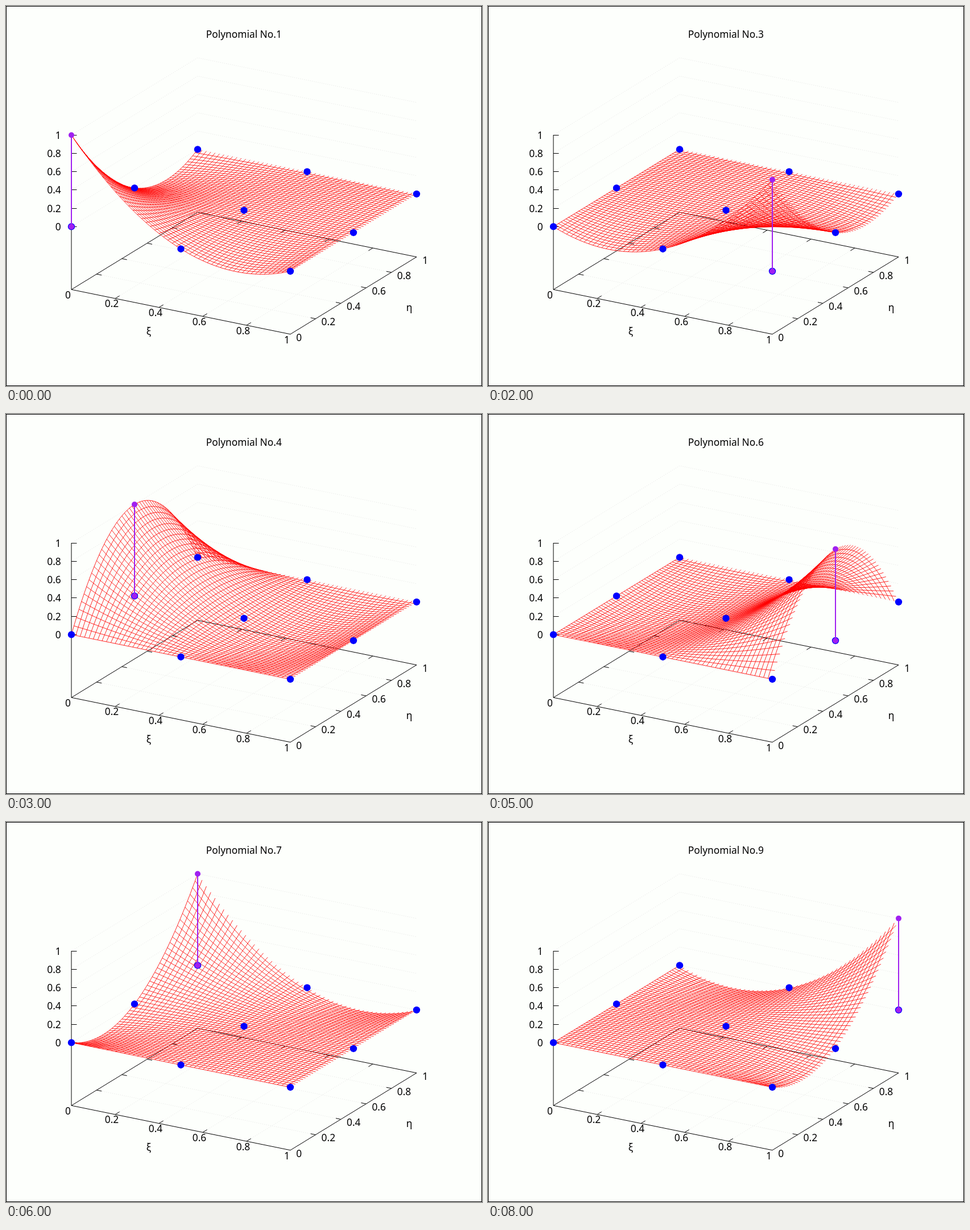
An HTML page for the animation above (9000 ms loop, 837 by 669 pixels).

```html
<!DOCTYPE html>
<html lang="en">
<head>
<meta charset="utf-8">
<title>Biquadratic polynomials</title>
<style>
html, body { margin: 0; width: 100%; height: 100%; overflow: hidden; background: #fdfffc; }
svg { display: block; width: 837px; height: 669px; }
text { font: 17.33px "Noto Sans", "Open Sans", sans-serif; fill: #000; }
path, line { fill: none; }
.axis { stroke: #000; stroke-width: 1; }
.grid { stroke: #e4e5e3; stroke-width: 1; stroke-dasharray: 1 2.5; }
.mesh { stroke: #f00; stroke-width: 0.85; stroke-linejoin: round; }
.node { fill: #00f; }
.stem { stroke: #a020f0; stroke-width: 2; }
.mark { fill: #a020f0; }
</style>
</head>
<body>
<svg id="stage" viewBox="0 0 837 669"></svg>
<script>
const stage = document.getElementById('stage');
const CELLS = 50, TICK = 9, HEIGHT = 272;
const fifths = [0, 0.2, 0.4, 0.6, 0.8, 1];
const halves = [0, 0.5, 1];
let unit, base;

function add(tag, attrs, text) {
  const el = document.createElementNS('http://www.w3.org/2000/svg', tag);
  for (const k in attrs) el.setAttribute(k, attrs[k]);
  if (text !== undefined) el.textContent = text;
  stage.append(el);
  return el;
}
const label = (x, y, text, anchor = 'middle') => add('text', { x, y, 'text-anchor': anchor }, text);
const place = (el, attrs) => { for (const k in attrs) el.setAttribute(k, attrs[k]); };

// Floor of the box, and the raised point for a value z
const floor = (u, v) => [115 + 385 * u + 222 * v, 499.2 + 78.6 * u - 136 * v];
function project(u, v, z) {
  const [x, y] = floor(u, v);
  return [x, y - base - unit * z];
}
const poly = pts => 'M' + pts.map(p => p[0].toFixed(2) + ' ' + p[1].toFixed(2)).join('L');
const tick = ([x, y], dx, dy) => poly([[x, y], [x + dx * TICK, y + dy * TICK]]);

// Quadratic Lagrange basis on the nodes 0, 1/2, 1
const basis = [
  t => (1 - t) * (1 - 2 * t),
  t => 4 * t * (1 - t),
  t => t * (2 * t - 1)
];

function setRange(zMin) {
  unit = HEIGHT / 1.5 / (1 - zMin);
  base = HEIGHT - unit;
}

// The lines run up to the far edges, which stay undrawn themselves
function meshPath(i, j) {
  const f = (u, v) => project(u, v, basis[i](u) * basis[j](v));
  const steps = Array.from({ length: CELLS + 1 }, (_, k) => k / CELLS);
  return steps.slice(0, CELLS).map(c =>
    poly(steps.map(s => f(s, c))) + poly(steps.map(s => f(c, s)))).join('');
}

// Static parts
add('path', { class: 'grid', d: fifths.slice(1, 5).map(t =>
  poly([floor(t, 0), floor(t, 1)]) + poly([floor(0, t), floor(1, t)])).join('') });
const walls = add('path', { class: 'grid' });

let box = poly([floor(0, 0), floor(1, 0), floor(1, 1), floor(0, 1), floor(0, 0)]) + 'V227';
for (const t of fifths.slice(1, 5)) {
  box += tick(floor(t, 0), 0.853, -0.522) + tick(floor(t, 1), -0.853, 0.522)
       + tick(floor(0, t), 0.98, 0.2) + tick(floor(1, t), -0.98, -0.2);
}
add('path', { class: 'axis', d: box });
const zTicks = add('path', { class: 'axis' });

const title = label(418.3, 56, '');
label(251, 579, 'ξ');
label(709, 537, 'η');
for (const t of fifths) {
  label(109 + 385 * t, 514.5 + 79 * t, t);
  label(510.2 + 222 * t, 589.5 - 136 * t, t, 'start');
}
const zLabels = fifths.map(t => label(96.7, 0, t, 'end'));

const mesh = add('path', { class: 'mesh' });
const nodes = halves.flatMap(v => halves.map(u => ({ u, v, el: add('circle', { class: 'node', r: 6.2 }) })));
const stem = add('line', { class: 'stem' });
const foot = add('circle', { class: 'mark', r: 5 });
const head = add('circle', { class: 'mark', r: 5 });
add('rect', { x: 0.5, y: 0.5, width: 836, height: 668, fill: 'none', stroke: '#000' });

function show(n) {
  // Only the central polynomial never goes below zero
  setRange(n === 4 ? 0 : -0.125);
  title.textContent = 'Polynomial No.' + (n + 1);
  walls.setAttribute('d', fifths.map(z =>
    poly([project(0, 0, z), project(0, 1, z), project(1, 1, z)])).join(''));
  zTicks.setAttribute('d', fifths.map(z => {
    const [x, y] = project(0, 0, z);
    return tick([x, Math.floor(y) + 0.5], 1.05, 0);
  }).join(''));
  zLabels.forEach((el, k) => el.setAttribute('y', project(0, 0, fifths[k])[1] + 6.5));
  mesh.setAttribute('d', meshPath(n % 3, Math.floor(n / 3)));
  for (const { u, v, el } of nodes) {
    const [cx, cy] = project(u, v, 0);
    place(el, { cx, cy });
  }
  const { u, v } = nodes[n];
  const [x, y0] = project(u, v, 0), y1 = project(u, v, 1)[1];
  place(stem, { x1: x, y1: y0, x2: x, y2: y1 });
  place(foot, { cx: x, cy: y0 });
  place(head, { cx: x, cy: y1 });
}

let shown = -1;
const start = performance.now();
function frame() {
  const n = Math.floor((performance.now() - start) / 1000) % 9;
  if (n !== shown) show(shown = n);
  requestAnimationFrame(frame);
}
frame();
</script>
</body>
</html>
```
